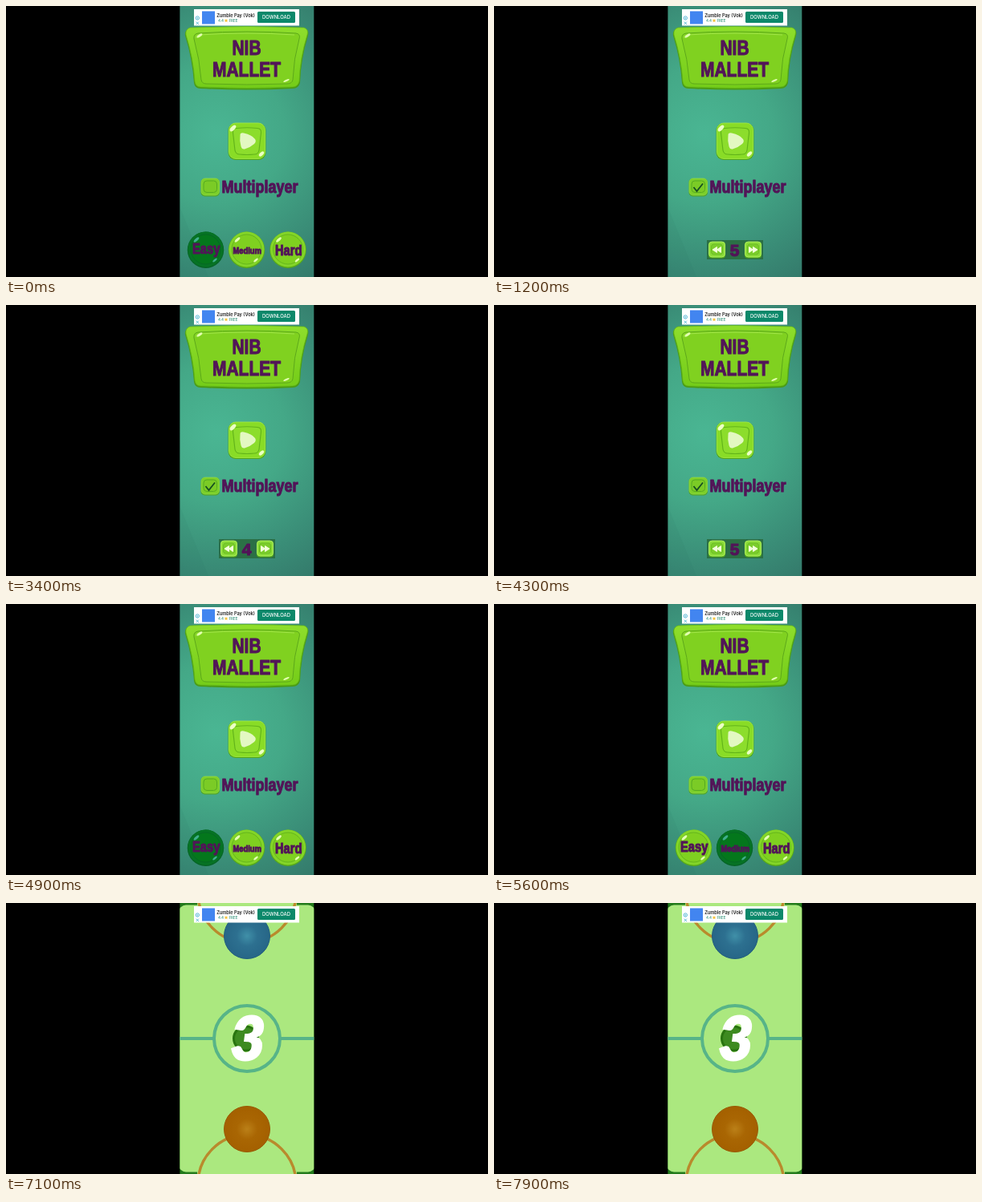
Recreate the animation shown at these times as an HTML page. Size 600 by 338 pixels, loop 8 s.

```html
<!DOCTYPE html>
<html lang="en">
<head>
<meta charset="utf-8">
<title>Game menu</title>
<style>
html, body { margin: 0; width: 100%; height: 100%; overflow: hidden; background: #000; }
svg { display: block; width: 100vw; height: 100vh; }
text { text-anchor: middle; }
.face { font-family: "Liberation Sans", sans-serif; font-weight: 700; fill: #521558; stroke: #521558; stroke-width: 1.1; stroke-linejoin: round; }
.ad text { font-family: Inter, sans-serif; }
.count { font: italic 900 76px Lato, sans-serif; fill: #fff; stroke: #fff; stroke-width: 2; }
</style>
</head>
<body>
<svg viewBox="0 0 600 338" preserveAspectRatio="none">
  <defs>
    <radialGradient id="wall" gradientUnits="userSpaceOnUse" cx="262" cy="160" r="215">
      <stop offset="0" stop-color="#4ab693"/>
      <stop offset=".4" stop-color="#44a887"/>
      <stop offset=".75" stop-color="#3a8d77"/>
      <stop offset="1" stop-color="#347a6b"/>
    </radialGradient>
    <linearGradient id="lime" x2="0" y2="1">
      <stop offset="0" stop-color="#8fde2c"/>
      <stop offset="1" stop-color="#74cc18"/>
    </linearGradient>
    <radialGradient id="blue">
      <stop offset="0" stop-color="#4090a8"/>
      <stop offset=".45" stop-color="#2d7090"/>
      <stop offset="1" stop-color="#276687"/>
    </radialGradient>
    <radialGradient id="amber">
      <stop offset="0" stop-color="#bb8018"/>
      <stop offset=".45" stop-color="#a96603"/>
      <stop offset="1" stop-color="#a46000"/>
    </radialGradient>
    <clipPath id="screen"><path d="M216.400 0H383.300V338H216.400Z"/></clipPath>
  </defs>
  <path d="M0 0H600V338H0Z"/>
  <g clip-path="url(#screen)">
    <g id="menu">
      <path d="M216 0H384V338H216Z" fill="url(#wall)"/>
      <path d="M216 250L252 338H216Z" fill="#1f6a58" opacity=".07"/>

      <path d="M229 27Q300 25 371 27Q378 30 376 37Q367 66 366 96Q364 103 357 103Q300 106 242 103Q235 103 234 96Q232 66 223 37Q222 30 229 27Z" fill="#4a9c14"/>
      <path d="M229 27Q300 24 371 27Q377 29 375 36Q366 65 365 94Q363 101 357 101Q300 104 242 101Q236 101 235 94Q233 65 224 36Q223 29 229 27Z" fill="url(#lime)" stroke="#62b41a" stroke-width=".7"/>
      <path d="M239 34Q300 30 361 34Q367 35 365 41Q358 66 357 92Q356 97 350 97Q300 99 249 97Q244 97 243 92Q241 66 234 41Q233 35 239 34Z" fill="#80d120" stroke="#5ca81a" stroke-width="1"/>
      <path d="M237 40Q236 36 241 36Q300 32 359 36" fill="none" stroke="#a8e854" stroke-width=".8"/>
      <g fill="#e3ffb0">
        <ellipse cx="241" cy="37" rx="4" ry="1.500" transform="rotate(-35 241 37)"/>
        <ellipse cx="349" cy="93" rx="4" ry="1.200" transform="rotate(-25 349 93)"/>
      </g>
      <g id="title"></g>

      <rect x="276.500" y="146" width="47" height="46" rx="9" fill="#52a616"/>
      <rect x="277.500" y="146" width="45" height="44.500" rx="8.500" fill="#89dc26" stroke="#a4ea48" stroke-width=".8"/>
      <path d="M287 152.500Q300 151 313 152.500Q318 153 317.500 158L315 180Q314 185 309 185Q300 186 291 185Q286 185 285 180L282.500 158Q282 153 287 152.500Z" fill="#8cdd2c" stroke="#62b41a" stroke-width="1.200"/>
      <path d="M291.500 161Q291.500 157.500 296 158.500Q306 160.500 310 166Q312 169 309 172Q304 176.500 297 178.500Q293.500 179 292.500 175Q290.500 168 291.500 161Z" fill="#e3f8c2"/>
      <g fill="#ecffc6">
        <ellipse cx="282.500" cy="152.500" rx="4.800" ry="2.400" transform="rotate(-45 282.500 152.500)"/>
        <ellipse cx="318" cy="184.500" rx="4" ry="2" transform="rotate(-45 318 184.500)"/>
      </g>

      <rect x="242.500" y="215" width="23.500" height="22.500" rx="5" fill="#4fa522"/>
      <rect x="243" y="215" width="22.500" height="21" rx="5" fill="#7ccf2a" stroke="#9ade50" stroke-width=".6"/>
      <rect x="246" y="218" width="16.500" height="14.500" rx="4" fill="#7bcb26" stroke="#56aa20" stroke-width="1"/>
      <path id="tick" d="M248.500 226L252.500 231L260 221.500" fill="none" stroke="#164f20" stroke-width="1.800"/>
      <g id="label"></g>

      <g id="levels"></g>
      <g id="stepper">
        <rect x="265" y="292" width="70" height="24" fill="#2b7046"/>
        <g id="less"></g>
        <g id="more"></g>
        <text id="score" class="face" x="299.500" y="311.500" font-size="21"></text>
      </g>
    </g>

    <g id="game">
      <path d="M216 0H384V338H216Z" fill="#237a1c"/>
      <path d="M238 0H362V338H238Z" fill="#abe87f"/>
      <rect x="215" y="2.500" width="170" height="333" rx="9" fill="#abe87f"/>
      <g fill="none" stroke="#b98a2c" stroke-width="3.500">
        <circle cx="300" cy="-12" r="61"/>
        <circle cx="300" cy="350" r="61"/>
      </g>
      <g fill="none" stroke="#57b488" stroke-width="4">
        <path d="M216 169H258M342 169H384"/>
        <circle cx="300" cy="169" r="41"/>
      </g>
      <circle cx="300" cy="41" r="28.500" fill="url(#blue)" stroke="#235f7d"/>
      <circle cx="300" cy="282" r="28.500" fill="url(#amber)" stroke="#995800"/>
      <circle cx="298.500" cy="169" r="15" fill="#3d8a20" stroke="#28740f" stroke-width="3"/>
      <text class="count" x="301" y="196">3</text>
    </g>

    <g class="ad">
      <path d="M234 4H365V24.500H234Z" fill="#fff"/>
      <g fill="none" stroke="#35a9cc" stroke-width=".8">
        <circle cx="238.300" cy="15" r="2.200"/>
        <path d="M238.300 14V16.300M236.700 19.700L240 23M240 19.700L236.700 23"/>
      </g>
      <rect x="244" y="6.500" width="16" height="16" fill="#4285f0"/>
      <text x="286" y="13.500" font-size="5.600" font-weight="600" fill="#222">Zumble Pay (Vok)</text>
      <text x="267.500" y="19.800" font-size="4.600" fill="#168467">4.4</text>
      <path d="M274 15.700L274.700 17.400L276.500 17.500L275.100 18.600L275.600 20.300L274 19.300L272.400 20.300L272.900 18.600L271.500 17.500L273.300 17.400Z" fill="#f5bd2b"/>
      <text x="283" y="19.800" font-size="4.600" fill="#168467">FREE</text>
      <rect x="313" y="7" width="47" height="14" rx="1.500" fill="#0c886a"/>
      <text x="336.500" y="16.200" font-size="5.900" font-weight="500" fill="#fff">DOWNLOAD</text>
    </g>
  </g>
</svg>
<script>
const LOOP = 8000;
const $ = id => document.getElementById(id);
const show = (id, on) => { $(id).style.display = on ? "" : "none"; };

// Condensed display lettering, centred on x
const word = (s, x, y, size) =>
  `<text class="face" font-size="${size}" transform="translate(${x} ${y}) scale(.84 1)">${s}</text>`;

const arrowButton = (x, dir) => `
  <rect x="${x - 10.5}" y="294" width="21" height="20.500" rx="4" fill="#58ae18"/>
  <rect x="${x - 10}" y="294" width="20" height="19" rx="4" fill="#8bdc38" stroke="#baf56c" stroke-width=".8"/>
  <rect x="${x - 7}" y="297" width="14" height="13" rx="3" fill="#7bcd2c" stroke="#62b51e" stroke-width=".7"/>
  <path transform="translate(${x} 304) scale(${dir} 1)" d="M-5 -3.500L0 0L-5 3.500ZM0 -3.500L5.500 0L0 3.500Z"
    fill="#f2ffda" stroke="#f2ffda" stroke-width="1" stroke-linejoin="round"/>`;

const levels = [
  { name: "Easy", x: 248.5, y: 309, size: 17.5 },
  { name: "Medium", x: 299.5, y: 308.5, size: 11.2 },
  { name: "Hard", x: 351, y: 311, size: 17.5 }
];

function levelButton({ name, x, y, size }, on) {
  const [edge, rim, face, glow] = on
    ? ["#066426", "#067324", "#04771c", "#3fae8c"]
    : ["#58aa18", "#84d528", "#7fd020", "#e4ffb4"];
  return `<circle cx="${x}" cy="304.300" r="22.700" fill="${edge}"/>
    <circle cx="${x}" cy="303.500" r="22" fill="${rim}"/>
    <circle cx="${x}" cy="303.500" r="18.500" fill="${face}" stroke="${edge}" stroke-width=".7"/>
    <ellipse cx="${x - 11.5}" cy="291.500" rx="4.200" ry="1.600" fill="${glow}" transform="rotate(-42 ${x - 11.5} 291.500)"/>
    <ellipse cx="${x + 11.5}" cy="317" rx="3.500" ry="1.200" fill="${glow}" transform="rotate(-42 ${x + 11.5} 317)"/>
    ${word(name, x + .7, y, size)}`;
}

$("title").innerHTML = word("NIB", 299.5, 60.5, 25) + word("MALLET", 299.5, 87.5, 25);
$("label").innerHTML = word("Multiplayer", 316, 233, 21.4);
$("less").innerHTML = arrowButton(277.5, -1);
$("more").innerHTML = arrowButton(322.5, 1);

const steps = [
  { at: 0, level: 0 },
  { at: 600, score: 5 },
  { at: 1600, score: 4 },
  { at: 2100, score: 3 },
  { at: 3100, score: 4 },
  { at: 3700, score: 5 },
  { at: 4700, level: 0 },
  { at: 5300, level: 1 },
  { at: 7000, game: true }
];
let current;

function draw(t) {
  const step = steps.filter(s => s.at <= t).pop();
  if (step === current) return;
  current = step;
  const multi = step.score !== undefined;
  show("menu", !step.game);
  show("game", step.game);
  show("tick", multi);
  show("stepper", multi);
  show("levels", !multi);
  if (multi) {
    $("score").textContent = step.score;
    $("less").setAttribute("opacity", step.score === 3 ? .45 : 1);
  } else if (!step.game) {
    $("levels").innerHTML = levels.map((l, i) => levelButton(l, i === step.level)).join("");
  }
}

const start = performance.now();
function tick() {
  draw((performance.now() - start) % LOOP);
  requestAnimationFrame(tick);
}
tick();
</script>
</body>
</html>
```
